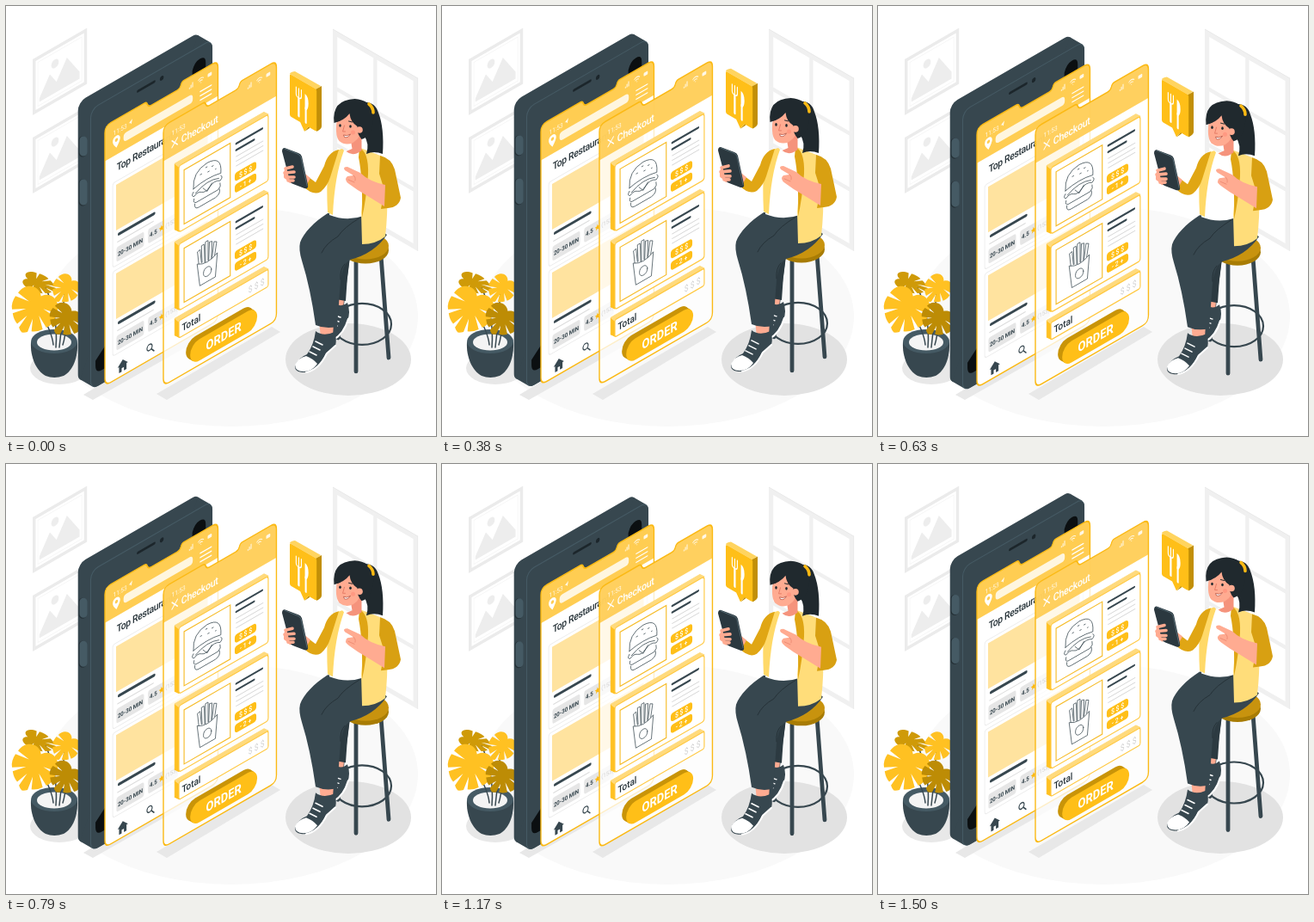
An HTML page that plays this animation: 500 px wide and 500 px high, repeating every 1.54 s.

```html
<!DOCTYPE html>
<html lang="en">
<head>
<meta charset="utf-8">
<title>Food order</title>
<style>
@property --k { syntax: "<number>"; inherits: true; initial-value: 0; }
html, body { margin: 0; width: 100%; height: 100%; overflow: hidden; background: #fff; }
svg { display: block; width: 100%; height: 100%; --k: 0; animation: tick 1540ms steps(37, end) -1293.5ms infinite; }
/* linear rise and fall, --k counts the 37 poses of a loop */
.float {
  --tri: calc(1 - max(var(--k) - 18, 18 - var(--k)) / 18.5);
  transform: translateY(calc(var(--lo) + var(--span) * var(--tri)));
}
.soft { --lo: -3px; --span: 10px; }
.tag { --lo: -9px; --span: 30px; }
@keyframes tick { from { --k: 0; } to { --k: 37; } }
text { font-family: Roboto, sans-serif; font-weight: 500; }
.bold { font-weight: 700; }
.thin { font-weight: 400; }
.line { fill: none; stroke-linecap: round; stroke-linejoin: round; }
.mid { text-anchor: middle; }
</style>
</head>
<body>
<svg viewBox="0 0 500 500" xmlns="http://www.w3.org/2000/svg">
<defs>
  <path id="plate" d="M8 0H53q3 0 4 3.500t5 3.500H97q4 0 5-3.500t4-3.500H144q7.800 0 7.800 8V294q0 8-8 8H8q-8 0-8-8V8q0-8 8-8z"/>
  <clipPath id="head"><rect x="-2" y="-2" width="157" height="43"/></clipPath>

  <g id="status" fill="#fff" opacity=".85">
    <text x="11" y="17" font-size="7.500" class="thin">11:53</text>
    <path d="M113 14h1v-2h-1zm2 0h1.200v-4H115zm2.200 0h1.200v-6h-1.200z"/>
    <path class="line" stroke="#fff" d="M125.500 10q3.500-3 7 0M127 12q2-1.600 4 0M129 14h.1"/>
    <rect x="138" y="8.500" width="5.500" height="4" rx="1"/>
  </g>

  <g id="shop">
    <rect x="10.500" y="72" width="132" height="98" rx="3" fill="none" stroke="#ececec"/>
    <rect x="15" y="76" width="123" height="53" fill="#ffe39f"/>
    <path class="line" stroke="#37474f" stroke-width="3.400" d="M19 135H66"/>
    <path class="line" stroke="#dcdcdc" stroke-width="1.200" d="M17 143.500H65"/>
    <g fill="#e6e6e6">
      <rect x="15.500" y="149" width="37" height="17" rx="2.500"/>
      <rect x="58" y="149" width="40" height="17" rx="2.500"/>
    </g>
    <g font-size="7" fill="#37474f">
      <text x="34" y="160.500" class="mid bold">20-30 MIN</text>
      <text x="60" y="159.500" class="bold">4.5</text>
      <text x="81" y="159.500" fill="#666">(153)</text>
    </g>
    <path fill="#fbb913" d="M76 153l1 2.500 2.600.2-2 1.700.7 2.600-2.300-1.400-2.300 1.400.7-2.600-2-1.700 2.600-.2z"/>
  </g>

  <g id="dish">
    <path fill="#ffc122" stroke="#ffc122" stroke-linejoin="round" d="M0 1L-5.500-5V71L0 76z"/>
    <path fill="#ffda7c" stroke="#ffda7c" stroke-linejoin="round" d="M0 1L-5.500-5.500H114L120 0z"/>
    <rect width="120" height="77" rx="3" fill="#fff" stroke="#ffc840" stroke-width="1.300"/>
    <rect x="7" y="8" width="62" height="63" fill="#fff" stroke="#f6bb26" stroke-width="1.300"/>
    <path class="line" stroke="#37474f" stroke-width="2.400" d="M77 12.500H112M77 20H101"/>
    <path class="line" stroke="#d6d6d6" d="M77 27.500H113M77 33H113M77 38.500H113"/>
    <g fill="#ffbf18">
      <rect x="75" y="46" width="29" height="10" rx="3.500"/>
      <rect x="75" y="59.500" width="29" height="10" rx="3.500"/>
    </g>
    <text x="89.500" y="54" class="mid" font-size="8" fill="#fff">$ $ $</text>
  </g>

  <g id="art">
    <path fill="#fff" stroke="#ebebeb" stroke-width="4" d="M2 2H71V63H2z"/>
    <path fill="none" stroke="#f6f6f6" d="M7 7H66V58H7z"/>
    <path fill="#ededed" d="M9 54V50L23 29 32 42 46 21 63 46V54z"/>
    <circle cx="30" cy="20" r="5" fill="#ededed"/>
  </g>

  <path id="leaf" d="M0-18C8-30 26-24 27-8L10-5 28-3Q29 8 24 14L9 5 21 18Q16 25 10 27L4 12 6 30Q3 33 0 34Q-3 33-6 30L-4 12-10 27Q-16 25-21 18L-9 5-24 14Q-29 8-28-3L-10-5-27-8C-26-24-8-30 0-18z"/>
</defs>

<!-- room -->
<ellipse cx="262" cy="361" rx="217" ry="128" fill="#f9f9f9"/>
<use href="#art" transform="matrix(.866 -.5 0 1 31 62)"/>
<use href="#art" transform="matrix(.866 -.5 0 1 31 153)"/>
<g transform="matrix(.866 .5 0 1 380 27)">
  <path fill="#fff" stroke="#f0f0f0" stroke-width="6" d="M3 3H111V198H3z"/>
  <path fill="none" stroke="#f0f0f0" stroke-width="5" d="M57 3V198M3 67H111M3 132H111"/>
  <path fill="none" stroke="#e8e8e8" d="M0 0H114V201"/>
</g>
<g fill="#e8e8e8">
  <path d="M90 452L101 458 246 376 232 367zM175 451L187 458 319 379 309 373z"/>
  <ellipse cx="62" cy="421" rx="34" ry="19"/>
</g>
<ellipse cx="398" cy="411" rx="73" ry="42" fill="#e2e2e2"/>

<!-- plant -->
<path fill="#37474f" d="M29 391C28 408 35 424 46 430Q56 434 67 430C78 424 84 408 83 391z"/>
<ellipse cx="56" cy="390" rx="27" ry="14" fill="#455a64"/>
<ellipse cx="56" cy="391" rx="20" ry="9.500" fill="#f4f4f4"/>
<path class="line" stroke="#37474f" stroke-width="1.500" d="M55 394Q54 380 38 352M58 397Q61 360 45 325M62 397Q66 365 68 332M66 394Q69 385 70 368"/>
<use href="#leaf" transform="translate(37 322) rotate(-68) scale(.38 .7)" fill="#cf9a08"/>
<use href="#leaf" transform="translate(70 328) rotate(38) scale(.56 .58)" fill="#ffc122"/>
<use href="#leaf" transform="translate(33 352) rotate(28) scale(.94 .92)" fill="#ffc122"/>
<use href="#leaf" transform="translate(70 364) rotate(35) scale(.72 .62)" fill="#bd8c05"/>

<g class="float soft">
  <!-- phone -->
  <g transform="matrix(.866 -.5 0 1 98 120)">
    <g fill="#37474f">
      <rect x="-16.500" y="-16.500" width="164" height="327" rx="10"/>
      <path d="M161.100 2.900L144.600-13.600-13.600 307.600 2.900 324.100z"/>
    </g>
    <rect width="164" height="327" rx="10" fill="#455a64"/>
    <rect x="1.200" y="1.200" width="162.800" height="325.800" rx="9.500" fill="#37474f"/>
    <path fill="#0b0f11" d="M137 24Q140 15 147 15q8 0 8 8V60H137zM7 296L20 285V311H16q-9 0-9-9z"/>
    <path class="line" stroke="#1c262b" stroke-width="3" d="M64 11H86"/>
    <circle cx="96" cy="12" r="2.600" fill="#1c262b"/>
  </g>
  <g class="line" stroke-width="9">
    <path stroke="#263238" d="M89 156V171M89 206V228"/>
    <path stroke="#455a64" d="M90 156V170M90 206V227"/>
  </g>

  <!-- restaurant list -->
  <g transform="matrix(.866 -.5 0 1 115 139.500)">
    <use href="#plate" fill="#fff"/>
    <use href="#plate" fill="#ffcd52" clip-path="url(#head)"/>
    <use href="#status"/>
    <path fill="#fff" opacity=".85" d="M32 13l5-3-1.500 5.500-1.500-2z"/>
    <path fill="#fff" fill-rule="evenodd" d="M15.500 33Q10.500 27 10.500 24a5 5 0 0 1 10 0Q20.500 27 15.500 33zm0-11a2 2 0 1 0 .1 0z"/>
    <rect x="25" y="21.500" width="93" height="10" rx="4" fill="#fff6df"/>
    <path class="line" stroke="#fff" stroke-width="1.400" d="M128 24H143M128 29H143M128 34H143"/>
    <text x="16" y="60.500" font-size="12" letter-spacing="-.4" fill="#263238">Top Restaurants</text>
    <use href="#shop"/>
    <use href="#shop" y="103"/>
    <path fill="#37474f" d="M17 290l7-6.500 7 6.500h-2v7h-3.500v-4h-3v4h-3.500v-7z"/>
    <g class="line" stroke="#37474f" stroke-width="1.300"><circle cx="60" cy="287.500" r="3.500"/><path d="M62.500 290.500l3.500 4"/></g>
    <use href="#plate" fill="none" stroke="#fbb913" stroke-width="1.600"/>
  </g>

  <!-- checkout -->
  <g transform="matrix(.866 -.5 0 1 183 139.500)">
    <use href="#plate" fill="#fff" fill-opacity=".76"/>
    <use href="#plate" fill="#ffcd52" fill-opacity=".92" clip-path="url(#head)"/>
    <use href="#status"/>
    <path class="line" stroke="#fff" stroke-width="1.300" d="M11.500 23L19 31M19 23L11.500 31"/>
    <text x="24" y="32" font-size="12.200" letter-spacing="-.3" fill="#fff">Checkout</text>

    <g transform="translate(20.800 57)">
      <use href="#dish"/>
      <text x="89.500" y="67.500" class="mid" font-size="8" fill="#fff">- 1 +</text>
      <g class="line" stroke="#37474f" stroke-width=".8" transform="translate(3 1.500) scale(.92)">
        <path d="M18 38Q16 16 38 15Q60 16 58 38Q38 33 18 38zM18 42Q14 46 19 48Q24 44 30 48T42 47T57 47Q62 44 58 41M21 45Q38 36 55 43M32 44L38 51 45 44M19 51Q17 56 22 57H54Q59 55 57 50M20 58Q19 65 26 65H50Q58 64 56 57"/>
        <path d="M28 25h2M36 20h2M45 23h2M39 27h2M50 29h1"/>
      </g>
    </g>
    <g transform="translate(20.800 148)">
      <use href="#dish"/>
      <text x="89.500" y="67.500" class="mid" font-size="8" fill="#fff">- 2 +</text>
      <g class="line" stroke="#37474f" stroke-width=".8" transform="translate(4.500 4.500) scale(.89)">
        <path fill="#fff" d="M25 36L23 19 27 18 29 36M30 36L29 14H33L34 38M35 38V12H39V38M40 38L41 15 45 16 44 38M45 37L48 18 52 20 49 36"/>
        <path fill="#fff" d="M23 35Q38 44 53 35L50 65H27z"/>
        <circle cx="38" cy="52" r="6"/>
      </g>
    </g>

    <g transform="translate(20.800 237)">
      <path fill="#ffc122" stroke="#ffc122" stroke-linejoin="round" d="M0 1L-5.500-5V14L0 19z"/>
      <path fill="#ffda7c" stroke="#ffda7c" stroke-linejoin="round" d="M0 1L-5.500-5.500H114L120 0z"/>
      <rect width="120" height="20" rx="2" fill="#fff" stroke="#ffc840" stroke-width="1.300"/>
      <text x="4" y="14.500" font-size="11.500" fill="#263238">Total</text>
      <text x="104" y="14.500" class="mid thin" font-size="10" fill="#d3d3d3">$ $ $</text>
    </g>

    <g fill="#c99408">
      <rect x="30.200" y="266" width="90" height="25" rx="12.500"/>
      <path d="M39.700 293.300L33.900 287.400 116.500 269.800 122.300 275.700z"/>
    </g>
    <rect x="36" y="272" width="90" height="25" rx="12.500" fill="#ffbf18"/>
    <text x="81" y="290" class="mid bold" font-size="15" fill="#fff">ORDER</text>
    <use href="#plate" fill="none" stroke="#fbb913" stroke-width="1.600"/>
  </g>

  <!-- stool -->
  <g class="line" stroke="#37474f">
    <ellipse cx="414" cy="370" rx="34" ry="24" stroke-width="2.200"/>
    <path stroke-width="4.800" d="M397 294L386 386M407 296V425M436 290L445 409"/>
  </g>
  <ellipse cx="418" cy="284" rx="27" ry="15.500" fill="#a87c04"/>
  <ellipse cx="418" cy="279" rx="27" ry="15.500" fill="#c8930e"/>

  <!-- legs -->
  <path fill="#ffab91" d="M381 338L393 341 392 352 382 351z"/>
  <path fill="#2c3a41" d="M376 280L400 292Q396 318 395 343L378 340z"/>
  <path fill="#37474f" d="M383 346Q390 351 397 345Q401 356 397 366Q392 383 382 388L376 385Q374 372 381 362z"/>
  <path class="line" stroke="#fff" stroke-width="2.200" d="M398 364Q393 381 381 388"/>
  <path class="line" stroke="#fff" stroke-width="1.400" d="M383 360l6 2M381 365l6 2M379 370l6 2"/>
  <path fill="#ffab91" d="M364 366L381 368 380 384 366 386z"/>
  <path fill="#37474f" d="M374 241C358 251 346 264 342 275Q340 283 344 296Q354 328 360 371Q371 376 385 373L389 320Q391 301 400 295Q428 288 443 266L414 244z"/>
  <path class="line" stroke="#263238" d="M412 246Q392 258 386 268Q372 276 367 287M389 318Q388 306 394 300"/>
  <path fill="#37474f" d="M360 378Q369 385 382 379Q385 387 383 395L372 404Q363 424 347 426Q335 426 336 418Q340 409 350 405Q358 394 360 378z"/>
  <path fill="#fff" d="M336 417Q340 409 349 407Q357 410 362 416Q356 425 346 425Q336 425 336 417z"/>
  <path class="line" stroke="#fff" stroke-width="2" d="M383 395L373 404Q364 423 349 426"/>
  <path class="line" stroke="#fff" stroke-width="1.600" d="M360 390l8 4M357 396l8 4M353 402l8 4"/>

  <!-- body -->
  <path fill="#fff" d="M383 169L411 166 416 244Q396 251 376 243L380 200z"/>
  <path fill="#ffd968" d="M391 166L381 169Q371 182 374 240L380 243Q382 198 393 168z"/>
  <path fill="#ffdd7a" d="M412 165L438 175Q447 215 441 268Q430 277 414 277L413 240Q418 205 412 165z"/>
  <path fill="#dfa514" d="M411 165Q422 170 421 196Q419 224 414 246Q415 200 410 176z"/>
  <path fill="#e0a614" d="M387 167Q374 170 370 186L360 205 352 199 346 210Q357 221 366 216Q374 209 377 199z"/>
  <path fill="#ffab91" d="M354 200L340 189 329 185Q322 188 323 199L330 206 342 204 348 211z"/>
  <path fill="#2b383f" d="M324 165L340 171Q343 172 344 175L351 208Q352 213 347 212L334 207Q331 206 330 203L321 169Q321 165 324 165z"/>
  <path class="line" stroke="#526770" d="M324 166L339 172Q342 173 343 176L350 209"/>
  <path class="line" stroke="#ffab91" stroke-width="3.600" d="M325 189L333 187M324 194L335 193M325 199L335 199M328 203L334 203"/>
  <path fill="#d8a012" d="M435 174Q448 177 452 190L459 223Q457 234 444 235L436 236 440 214 434 195z"/>
  <path fill="#ffab91" d="M441 208Q422 204 412 194L397 187Q391 187 394 191L404 197 397 198Q392 202 399 207L409 214Q424 223 440 233z"/>
  <path class="line" stroke="#ec8a72" stroke-width=".9" d="M404 197Q407 199 406 203M398 202L405 205"/>

  <!-- head -->
  <path fill="#20292e" d="M416 112Q429 111 433 124Q440 142 438 172Q428 168 419 172Q423 160 416 150z"/>
  <g transform="translate(-2.500 2)">
    <path fill="#f5937c" d="M403 152L416 144 416 166Q406 174 398 167L405 164z"/>
    <path fill="#ffab91" d="M388 126Q384 148 390 155Q397 161 406 157Q416 151 418 135L404 118z"/>
    <path fill="#20292e" d="M384 134Q381 107 408 106Q426 107 430 122Q430 149 416 153Q410 146 411 138Q403 133 402 123Q396 131 384 134z"/>
    <circle cx="413.500" cy="142" r="3.800" fill="#ffab91"/>
    <g fill="#20292e"><ellipse cx="391" cy="137" rx="1.300" ry="1.800"/><ellipse cx="403" cy="138" rx="1.300" ry="1.800"/></g>
    <path class="line" stroke="#20292e" d="M388 132l3-1M401 132l4 1"/>
    <path class="line" stroke="#e67c66" d="M396 137L394 144 397 144"/>
    <path fill="#fff" stroke="#b5513f" stroke-width=".8" d="M395 148Q399 150 403 147Q400 152 396 150.500z"/>
    <circle cx="406" cy="145" r="2.500" fill="#ff8e78" opacity=".6"/>
  </g>
  <path class="line" stroke="#fbb913" stroke-width="3.600" d="M422 114Q427 118 427 124"/>
</g>

<!-- food tag -->
<g class="float tag">
  <path fill="#ffd45f" d="M330 79Q330 77 336 76L366 93 361 97z"/>
  <path fill="#c28f07" d="M360 97L367 93V140Q367 143 361 146zM347 146L353 142 353 139z"/>
  <g transform="matrix(.866 .5 0 1 330 79)">
    <path fill="#ffbf18" d="M2 0H34q2 0 2 2V47q0 2-2 2H25L19.600 57 14 49H2q-2 0-2-2V2q0-2 2-2z"/>
    <g class="line" stroke="#fff">
      <path stroke-width="1.300" d="M8.500 11V19Q8.500 22 12 22T15.500 19V11M12 11V22"/>
      <path stroke-width="2.600" d="M12 22V43"/>
      <path stroke-width="2.400" d="M21.500 29V46"/>
    </g>
    <path fill="#fff" d="M20.300 31V13Q25 14 25 22 25 28 22.500 31z"/>
  </g>
</g>
</svg>
</body>
</html>
```
